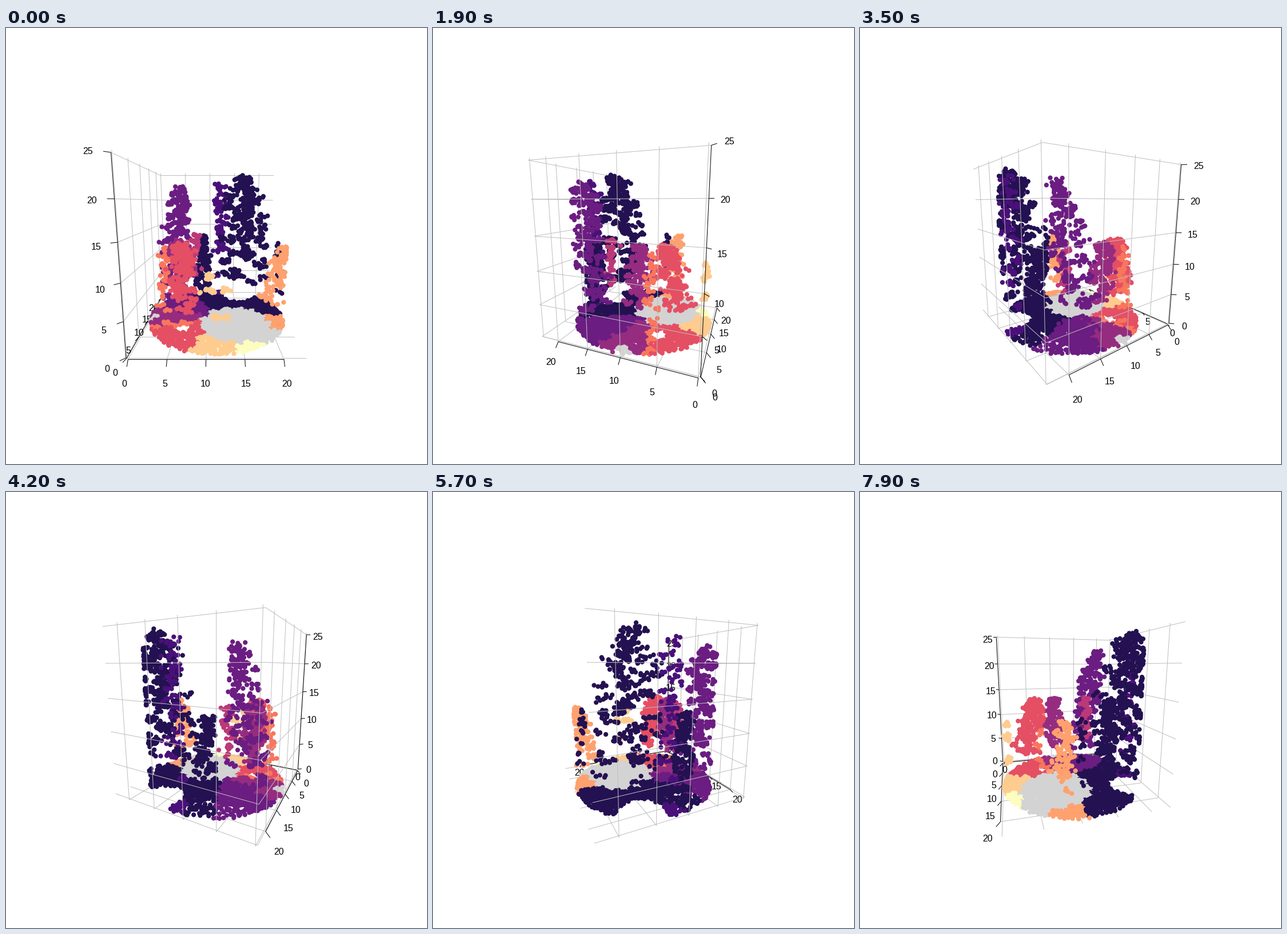
Recreate the animation shown at these times as a matplotlib script. Size 736 px wide and 761 px high, loop 8000 ms.

```python
import numpy as np
import matplotlib.pyplot as plt
from matplotlib.animation import FuncAnimation
from matplotlib.collections import LineCollection
from matplotlib.colors import to_rgba_array

W, H, DPI = 736, 761, 100
FRAMES, INTERVAL, STEP = 80, 100, 3.6
PX = 72 / DPI

# camera
DIST, FOCAL, NEAR = 40.5, 427, 20.4
TILT = np.radians(10.3)
CA, SA = np.cos(TILT), np.sin(TILT)

# box, horizontally centred on the origin; z measured from mid height
R = 11.6
MID, ZMID = 11.35, 12.45
ZLO, ZHI = -12.65, 12.85
TICK = np.array([0.58, 0.58, 0.64])
PAD = 2.9 * TICK

NAVY, INDIGO, PURPLE, PLUM, PINK = "#231151", "#4a1079", "#6b1d81", "#952c80", "#bc3978"
RED, CORAL, ORANGE, PEACH, PALE = "#e44f64", "#f8765c", "#fea16e", "#fecc8f", "#fcfdbf"
GRAY = "#d3d3d3"

rng = np.random.default_rng(12)


def project(p, deg):
    """Screen x, screen y and depth of world points."""
    s, c = np.sin(np.radians(deg)), np.cos(np.radians(deg))
    x, y, z = np.moveaxis(np.asarray(p, float), -1, 0)
    right, ahead = x * c - y * s, x * s + y * c
    depth = DIST + ahead * CA - z * SA
    k = FOCAL / depth
    return W / 2 + right * k, H / 2 - (z * CA + ahead * SA) * k, depth


def inside(p, limit=11.2):
    r = np.hypot(p[:, 0], p[:, 1])
    p[:, :2] *= np.minimum(1, limit / np.maximum(r, 1e-9))[:, None]
    return p


# ground colours run round the plot: (end angle, colour), with round patches on top
SECTORS = [(113, NAVY), (160, PURPLE), (195, PLUM), (201, CORAL), (249, RED),
           (288, PEACH), (309, PALE), (335, GRAY), (367, ORANGE)]
PATCHES = [(GRAY, 3, -3.2, 5.6), (GRAY, -11, -1.8, 1.2), (INDIGO, 0.4, 10.5, 1.7)]
HOLES = [(4.4, 8.8, 3.3), (-5.2, -4.4, 1.3)]


def ground(gap=0.43):
    g = np.arange(-11.2, 11.3, gap)
    u, v = (a.ravel() + rng.uniform(-gap / 2, gap / 2, a.size) for a in np.meshgrid(g, g))
    keep = np.hypot(u, v) < 11.25
    for x, y, r in HOLES:
        keep &= np.hypot(u - x, v - y) > r
    keep &= (v < 6) | (u > 0) | (rng.random(u.size) < 0.6)
    u, v = u[keep], v[keep]
    wu, wv = u + 0.4 * np.sin(2.3 * v), v + 0.4 * np.sin(2.6 * u)
    angle = (np.degrees(np.arctan2(wv + 1.5, wu)) - 7) % 360 + 7
    ends, names = zip(*SECTORS)
    color = np.array(names)[np.searchsorted(ends, angle)]
    for c, x, y, r in PATCHES:
        color[np.hypot(wu - x, wv - y) < r] = c
    return np.c_[u, v, rng.normal(0.25, 0.1, u.size)], color


def tree(low, high, width, clumps, size=6):
    """Flat clumps around a leaning trunk, denser and narrower to the top."""
    low, high = np.array(low, float), np.array(high, float)
    t = ((np.arange(clumps) + rng.random(clumps)) / clumps) ** 0.7
    r = width * (1 - 0.7 * t ** 4) * np.sqrt(rng.random(clumps))
    a = rng.uniform(0, 2 * np.pi, clumps)
    mid = low + t[:, None] * (high - low) + np.c_[r * np.cos(a), r * np.sin(a), 0 * a]
    p = np.repeat(mid, size, 0)
    spread = min(0.45, 0.25 + width / 8)
    return inside(p + rng.normal(0, 1, p.shape) * [spread, spread, 0.22])


def branch(x, z, half):
    n = int(9 * half) + 5
    return inside(np.c_[rng.uniform(x - half, x + half, n),
                        rng.normal(-10.3, 0.25, n), rng.normal(z, 0.2, n)])


PLANTS = [
    (NAVY, tree((4.8, 5.8, 3), (5.4, 7.9, 24.2), 4.8, 88)),
    (NAVY, tree((-2.6, 7.6, 0.8), (-2.9, 8, 13), 1.5, 36)),
    (NAVY, tree((10.2, -0.8, 4), (9.8, -1.2, 13), 0.4, 8, 3)),
    (INDIGO, tree((1, 9.8, 4), (0.8, 10, 23), 1.7, 22, 5)),
    (PURPLE, tree((-8, 4, 2), (-6.8, 7, 22.2), 2.7, 58)),
    (PLUM, tree((-6, -1.6, 4), (-6, -1.8, 13.8), 1.8, 34)),
    (PINK, tree((-4.2, 3.8, 6), (-3.9, 4, 14), 0.8, 12, 5)),
    (RED, tree((-4.8, -7.8, 3.5), (-5.1, -5, 13.7), 2.1, 46)),
    (CORAL, tree((-8.2, -4.4, 1), (-7.8, -4.2, 12.8), 0.7, 14, 4)),
    (ORANGE, tree((8.7, -3.6, 3), (10.2, -3.2, 13), 1.6, 30, 4)),
    (PEACH, branch(-0.2, 8.5, 2.2)),
    (PEACH, branch(-0.9, 10.5, 0.6)),
    (PEACH, branch(0.5, 5, 1.1)),
]

base_pts, base_cols = ground()
pts = np.vstack([base_pts] + [p for _, p in PLANTS])
pts[:, 2] -= ZMID
rgba = to_rgba_array(list(base_cols) + [c for c, p in PLANTS for _ in p])

FLAT = np.arange(0, 21, 5) - MID
TALL = np.arange(0, 26, 5) - ZMID

floor = [((t, -R, ZLO), (t, R, ZLO)) for t in FLAT] + [((-R, t, ZLO), (R, t, ZLO)) for t in FLAT]
wall_x = [((-R, t, ZLO), (-R, t, ZHI)) for t in FLAT] + [((-R, -R, t), (-R, R, t)) for t in TALL]
wall_y = [((t, R, ZLO), (t, R, ZHI)) for t in FLAT] + [((-R, R, t), (R, R, t)) for t in TALL]


def axis(dim, at):
    """Segments of one axis with ticks, and the label anchors."""
    base = np.tile([-R, -R, ZLO], (len(at), 1))
    base[:, dim] = at
    away = np.arange(3) != dim
    segs = [(base[0], base[-1])] + [(b, b - TICK * away) for b in base]
    return np.array(segs), base - PAD * away


AXES = [axis(0, FLAT), axis(1, FLAT), axis(2, TALL)]

fig = plt.figure(figsize=(W / DPI, H / DPI), dpi=DPI, facecolor="white")
ax = fig.add_axes([0, 0, 1, 1])
ax.set(xlim=(0, W), ylim=(H, 0))
ax.axis("off")


def lines(color):
    return ax.add_collection(LineCollection([], colors=color, linewidths=PX))


grids = [lines("#bebebe") for _ in range(3)]
rules = [lines("black") for _ in AXES]
dots = ax.scatter(pts[:, 0], pts[:, 1], s=(8.2 * PX) ** 2, c=rgba, linewidths=0, zorder=3)
labels = [[ax.text(0, 0, str(5 * i), family="Liberation Sans", size=16 * PX, ha="center", va="center")
           for i in range(len(anchors))] for _, anchors in AXES]


def place(art, segs, deg, zorder):
    x, y, _ = project(segs, deg)
    art.set_segments(np.stack([x, y], -1))
    art.set_zorder(zorder)


def update(i):
    deg = STEP * i
    x, y, depth = project(pts, deg)
    order = np.argsort(-depth)
    dots.set_offsets(np.c_[x, y][order])
    dots.set_facecolors(rgba[order])

    # which box faces the camera looks at from outside
    cam_x = -np.sin(np.radians(deg)) * DIST * CA
    cam_y = -np.cos(np.radians(deg)) * DIST * CA
    left, near, far = cam_x < -R, cam_y < -R, cam_y > R

    for art, segs, front in zip(grids, (floor, wall_x, wall_y), (False, left, far)):
        place(art, segs, deg, 4 if front else 1)

    for art, texts, (segs, anchors), front in zip(rules, labels, AXES, (near, left, left or near)):
        place(art, segs, deg, 5 if front else 2)
        for t, px, py, d in zip(texts, *project(anchors, deg)):
            t.set_position((px, py + 4))
            t.set_visible(bool(d > NEAR))
            t.set_zorder(6 if front else 2.5)
    return []


anim = FuncAnimation(fig, update, frames=FRAMES, interval=INTERVAL, repeat=True, repeat_delay=0)
plt.show()
```
